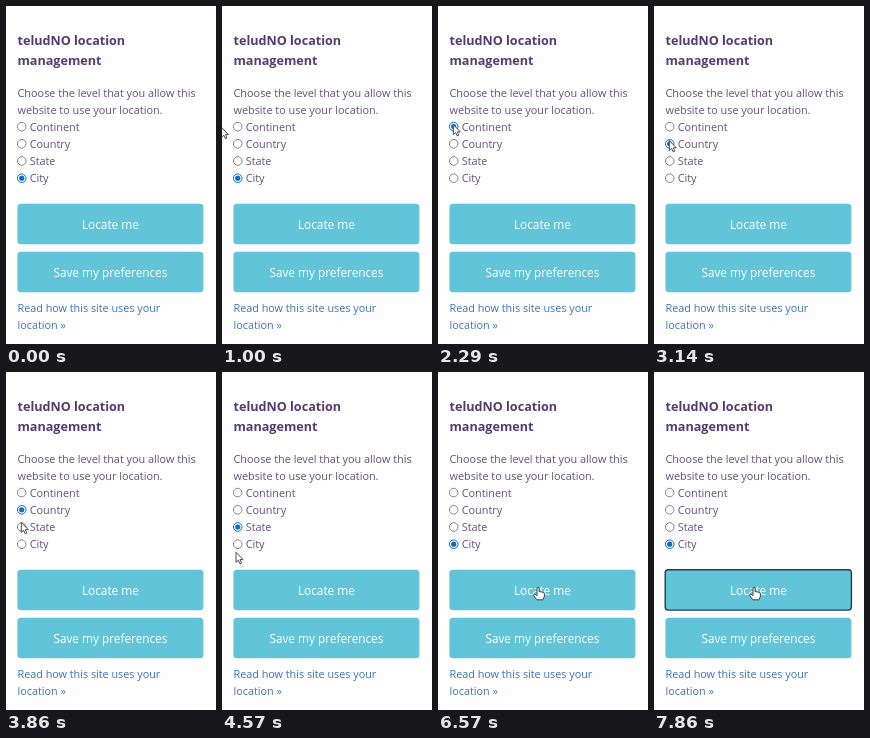
An HTML page that plays this animation: 210x338 px, repeating every 8.01 s.

```html
<!DOCTYPE html>
<html lang="en">
<head>
<meta charset="utf-8">
<title>Location management</title>
<style>
  html, body { margin: 0; width: 100%; height: 100%; overflow: hidden; background: #fefefe; }
  svg { display: block; width: 100%; height: 100%; }
  text { font: 10.87px "Open Sans", "Noto Sans", sans-serif; fill: #62527a; }
  .title { font-size: 12.6px; font-weight: 700; fill: #553b70; }
  .link { font-size: 10.8px; fill: #3e72b8; }
  .button { fill: #62c4d8; }
  .label { font-size: 11.8px; font-weight: 500; fill: #fff; text-anchor: middle; }
  .ring { fill: #fff; stroke: #858585; }
  .dot { fill: #0b6dcc; visibility: hidden; }
  .checked .ring { stroke: #0b6dcc; }
  .checked .dot { visibility: visible; }
  #focus { fill: none; stroke: #203f4c; stroke-width: 1.4; }
  #cursor path { fill: #fff; stroke: #3a3644; stroke-width: .9; stroke-linejoin: round; }
</style>
</head>
<body>
<svg viewBox="0 0 210 338" preserveAspectRatio="none">
  <text class="title" x="11.5" y="39">teludNO location</text>
  <text class="title" x="11.5" y="59">management</text>
  <text x="11.5" y="90.7">Choose the level that you allow this</text>
  <text x="11.5" y="107.8">website to use your location.</text>
  <g id="radios"></g>
  <rect class="button" x="11.4" y="197.7" width="186" height="40.5" rx="3.5"/>
  <text class="label" x="104.4" y="222.8">Locate me</text>
  <rect class="button" x="11.4" y="245.7" width="186" height="40.5" rx="3.5"/>
  <text class="label" x="104.4" y="270.8">Save my preferences</text>
  <rect id="focus" x="11.2" y="197.8" width="186.2" height="40.3" rx="3"/>
  <text class="link" x="11.5" y="305.7">Read how this site uses your</text>
  <text class="link" x="11.5" y="322.9">location »</text>
  <g id="cursor">
    <path id="arrow" d="M0 0V10L2.3 7.9L3.9 11.4L5.5 10.7L4 7.3H7Z"/>
    <path id="hand" d="M-1 1Q0-.6 1 1V5Q2.2 4.2 3 5.3Q4.2 4.6 4.9 5.8Q6.4 5.4 6.4 7V9.5L5 13H-1.3L-4.2 8.6Q-4.6 7 -3 7.3L-1 9Z"/>
  </g>
</svg>
<script>
  const LOOP = 8010, STEP = 143, LAST = 55, TRAVEL = 3;
  const $ = id => document.getElementById(id);

  const radios = ["Continent", "Country", "State", "City"].map((label, i) => {
    const y = 120.6 + i * 17.2;
    const group = document.createElementNS("http://www.w3.org/2000/svg", "g");
    group.innerHTML = `<circle class="ring" cx="15.7" cy="${y}" r="4.3"/>
      <circle class="dot" cx="15.7" cy="${y}" r="2.6"/>
      <text x="23.7" y="${y + 4.2}">${label}</text>`;
    $("radios").append(group);
    return group;
  });

  // Each radio is clicked in turn, at an even pace
  const checkedAt = step => step < 14 ? 3 : Math.min(3, Math.floor((step - 14) / 8));

  const offstage = { x: -12, y: 122 };
  const overRadio = i => ({ x: 15.3, y: 118.6 + i * 15.9 });
  const moves = [
    { end: 7, to: { x: -.5, y: 121.3 } },
    { end: 11, to: overRadio(0) },
    { end: 19, to: overRadio(1) },
    { end: 27, to: overRadio(2) },
    { end: 32, to: { x: 14, y: 180.3 } },
    { end: 36, to: overRadio(3) },
    { end: 46, to: { x: 100, y: 214.8 } }
  ];

  function ease(k) {
    k = Math.max(0, Math.min(1, k));
    return k * k * (3 - 2 * k);
  }

  function pointerAt(step) {
    return moves.reduce((from, { end, to }) => {
      const k = ease((step - end) / TRAVEL + 1);
      return { x: from.x + (to.x - from.x) * k, y: from.y + (to.y - from.y) * k };
    }, offstage);
  }

  const show = (el, on) => el.setAttribute("visibility", on ? "visible" : "hidden");

  function draw(now) {
    const step = Math.min(LAST, Math.floor((now % LOOP + 10) / STEP));
    const { x, y } = pointerAt(step);
    const onButton = y > 198;
    const checked = checkedAt(step);

    radios.forEach((radio, i) => radio.classList.toggle("checked", i === checked));
    $("cursor").setAttribute("transform", `translate(${x} ${y})`);
    show($("arrow"), !onButton);
    show($("hand"), onButton);
    show($("focus"), step === LAST);
  }

  const start = performance.now();
  (function tick() {
    draw(performance.now() - start);
    requestAnimationFrame(tick);
  })();
</script>
</body>
</html>
```
